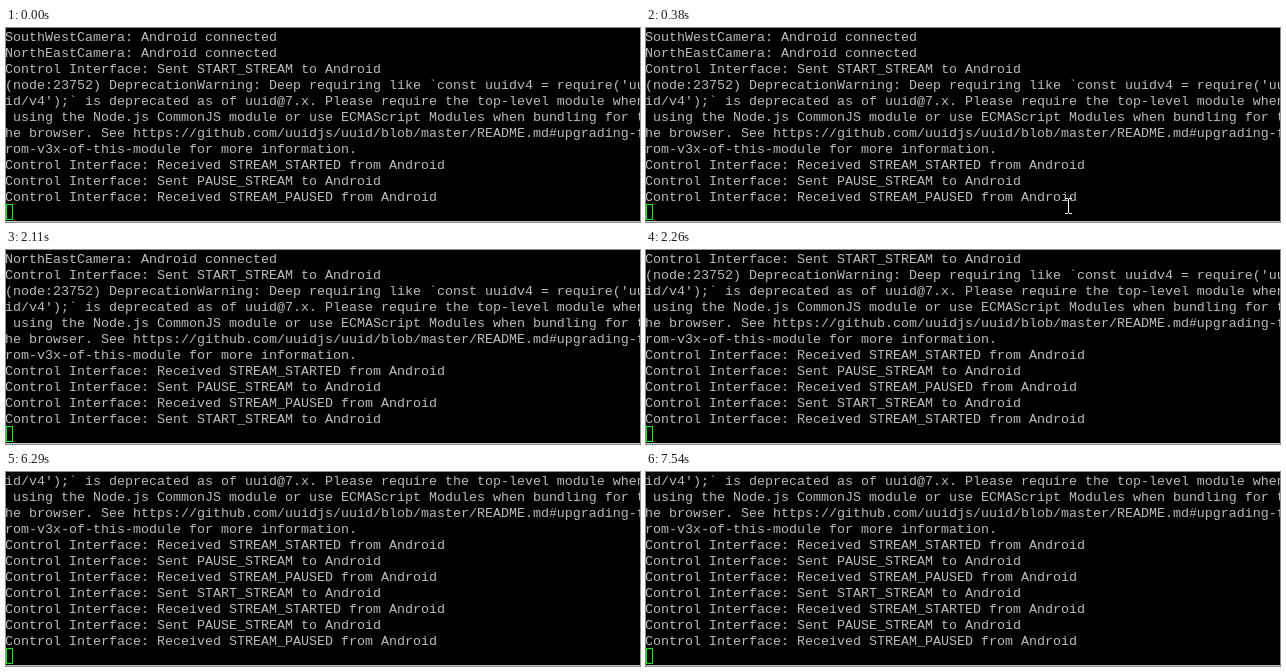
Write an HTML page that moves like this. It is 634 px wide and 194 px high and loops after 8090 ms.

```html
<!DOCTYPE html>
<html lang="en">
<head>
<meta charset="utf-8">
<title>Terminal log</title>
<style>
  html, body { margin: 0; width: 100%; height: 100%; overflow: hidden; background: #000; }
  svg { display: block; width: 634px; height: 194px; }
  text {
    font: 13.33px "Liberation Mono", "Courier New", monospace;
    fill: #bbb;
    white-space: pre;
  }
</style>
</head>
<body>
<svg viewBox="0 0 634 194" xmlns="http://www.w3.org/2000/svg">
  <rect width="634" height="194" fill="#000"/>
  <g id="log"></g>
  <rect x="0.5" y="176.5" width="6" height="15" fill="none" stroke="#0f0" shape-rendering="crispEdges"/>
  <rect y="193" width="634" height="1" fill="#c0c0c0"/>
  <path id="beam" d="M419 170.5h3m1 0h3M422.5 171v14M419 185.5h3m1 0h3" fill="none" stroke="#fff" shape-rendering="crispEdges"/>
  <rect id="tip" x="577" y="193" width="2" height="1" fill="#000"/>
</svg>
<script>
const LOOP = 8090, ROWS = 11, ROW_H = 16, LEFT = -1, BASE = 13;
const scrollTimes = [2110, 2260, 6140, 6290];

const sent = cmd => `Control Interface: Sent ${cmd}_STREAM to Android`;
const received = state => `Control Interface: Received STREAM_${state} from Android`;

const lines = [
  "SouthWestCamera: Android connected",
  "NorthEastCamera: Android connected",
  sent("START"),
  "(node:23752) DeprecationWarning: Deep requiring like `const uuidv4 = require('uu",
  "id/v4');` is deprecated as of uuid@7.x. Please require the top-level module when",
  " using the Node.js CommonJS module or use ECMAScript Modules when bundling for t",
  "he browser. See https://github.com/uuidjs/uuid/blob/master/README.md#upgrading-f",
  "rom-v3x-of-this-module for more information.",
  received("STARTED"),
  sent("PAUSE"),
  received("PAUSED"),
  sent("START"),
  received("STARTED"),
  sent("PAUSE"),
  received("PAUSED")
];

const byId = id => document.getElementById(id);
const log = byId("log"), beam = byId("beam"), tip = byId("tip");

const rows = Array.from({ length: ROWS }, (_, i) => {
  const row = document.createElementNS("http://www.w3.org/2000/svg", "text");
  row.setAttribute("x", LEFT);
  row.setAttribute("y", BASE + i * ROW_H);
  row.setAttribute("xml:space", "preserve");
  return log.appendChild(row);
});

const show = (el, on) => el.setAttribute("visibility", on ? "visible" : "hidden");
let shown = -1;

function draw(t) {
  const first = scrollTimes.filter(at => t >= at).length;
  if (first !== shown) {
    rows.forEach((row, i) => { row.textContent = lines[first + i]; });
    shown = first;
  }
  // The mouse pointer crosses the window twice.
  show(beam, t >= 380 && t < 450);
  show(tip, t >= 7470 && t < 7540);
}

const start = performance.now();
function tick() {
  draw((performance.now() - start) % LOOP);
  requestAnimationFrame(tick);
}
tick();
</script>
</body>
</html>
```
